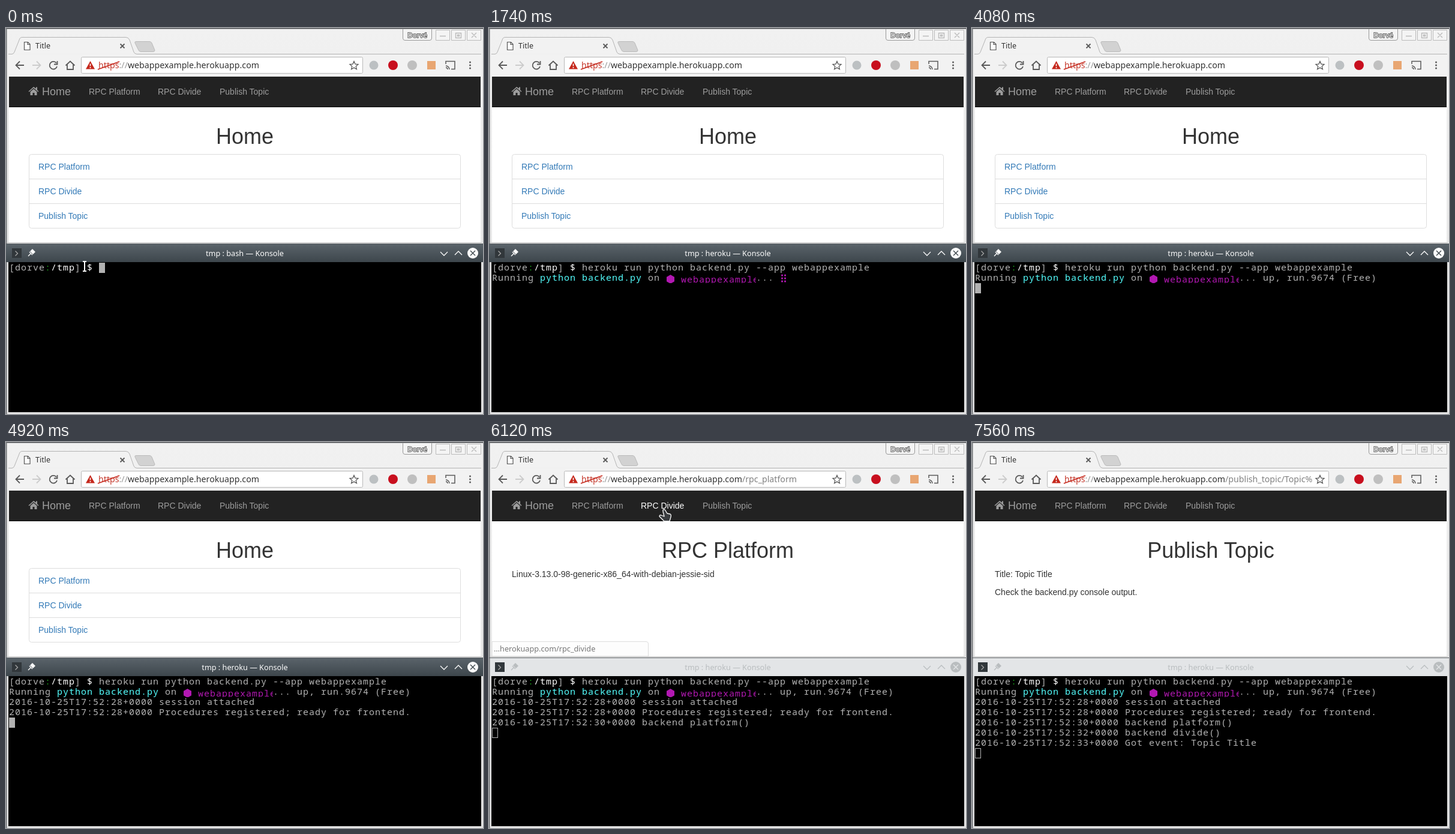
These frames come from a looping animation (795 by 643 pixels, 7580 ms). An HTML page:

```html
<!DOCTYPE html>
<html lang="en">
<head>
<meta charset="utf-8">
<title>Browser and terminal</title>
<style>
html, body { margin: 0; width: 100%; height: 100%; overflow: hidden; background: #e4e4e4; }
svg { display: block; }
text { white-space: pre; }
.ui { font-family: "Noto Sans", "Open Sans", sans-serif; font-size: 12.7px; }
.url { font-size: 14.2px; }
.page { font-family: "Liberation Sans", Arial, sans-serif; font-size: 14px; fill: #333; }
.nav { fill: #9d9d9d; }
.nav.hover { fill: #fff; }
.link { fill: #337ab7; }
.h1 { font-size: 36px; text-anchor: middle; }
.term { font-family: "Noto Sans Mono", "DejaVu Sans Mono", monospace; font-size: 15px; letter-spacing: 1px; fill: #b2b2b2; }
.w { fill: #fff; } .c { fill: #54ffff; } .m { fill: #b218b2; } .g { fill: #18a018; }
.line { fill: none; stroke: #5a5a5a; stroke-width: 1.8; }
</style>
</head>
<body>
<svg width="795" height="643" viewBox="0 0 795 643">
<defs>
  <linearGradient id="dark" x2="0" y2="1"><stop stop-color="#5a636a"/><stop offset="1" stop-color="#3d464c"/></linearGradient>
  <linearGradient id="strip" x2="0" y2="1"><stop stop-color="#f1f1f1"/><stop offset="1" stop-color="#e9e9e9"/></linearGradient>
  <clipPath id="field"><path d="M126 49H567V75H126z"/></clipPath>
  <clipPath id="appClip"><path d="M295 408H445V425H295z"/></clipPath>
  <g id="bar">
    <text class="ui" id="title" x="398" y="380" text-anchor="middle" fill="currentColor"></text>
    <path d="M37 380l4-4m-2-3l5 5m-3-6l3-3 4 4-3 3z" fill="currentColor" stroke="currentColor" stroke-width="1.4"/>
    <path d="M724 373l6 6 6-6M748 378l6-6 6 6" fill="none" stroke="currentColor" stroke-width="1.3"/>
    <circle cx="778" cy="375" r="9" fill="currentColor"/>
    <path d="M774 371l8 8m0-8l-8 8" style="stroke:var(--x)" stroke-width="1.4"/>
  </g>
</defs>

<!-- browser frame -->
<path d="M0 0H795V360H0z" fill="url(#strip)"/>
<path d="M0 0H795V1.5H0z" fill="#4a4d50"/>
<path d="M0 0H1.5V643H0z" fill="#74777a"/>
<path d="M4 44H792V81H4z" fill="#f2f2f2"/>
<path d="M4 43.5H10Q13 43 14 40L22 20Q23 15.5 27 15.5H200Q204 15.5 206 20L213 40Q214 43 218 43.5H792" fill="#f2f2f2" stroke="#b4b4b4"/>
<path d="M217 22.500H239Q242 22.500 243 25L248 37Q248 39.500 245 39.500H225Q222 39.500 221 37L215 25Q214 22.500 217 22.500z" fill="#d2d2d2" stroke="#bbb"/>
<path id="favicon" d="M30.500 23.500H36.500L40 27V36.500H30.500zM36 23.500V27.500H40" fill="#fff" stroke="#555" stroke-width="1.2"/>
<text class="ui" x="49" y="34" style="font-size:12.5px" fill="#333">Title</text>
<path d="M190.500 26.500l7 7m0-7l-7 7" class="line" stroke-width="1.5"/>
<path d="M661.500 2V17Q661.500 20.500 665 20.500H706Q709.500 20.500 709.500 17V2" fill="#f4f4f4" stroke="#999"/>
<text class="ui" x="685.500" y="16" text-anchor="middle" style="font-size:11.5px" fill="#fff" stroke="#666" stroke-width="2" paint-order="stroke">Dorvé</text>
<g fill="#f4f4f4" stroke="#bbb">
  <path d="M716.500 3.500h23v17h-23zM742.500 3.500h23v17h-23zM768.500 3.500h23v17h-23z"/>
  <path d="M723 13.500h10M749.500 8.500h9v8h-9zM752.500 11.500h3v2h-3zM776 8l8 8m0-8l-8 8" stroke-width="1.4"/>
</g>

<!-- toolbar -->
<g class="line">
  <path d="M30 62H17M23 55.500L16.500 62l6.500 6.500"/>
  <path d="M44 62H57M51 55.500l6.500 6.500-6.500 6.500" stroke="#ccc"/>
  <path id="reload" d="M84 58.500A6.300 6.300 0 1 0 85 64M85.500 55V60.500H80"/>
  <path id="stop" d="M73.500 56.500l11 11m0-11l-11 11"/>
  <path d="M99.500 62.500L107 55.500l7.500 7M102 61V69H112V61"/>
</g>
<rect x="125.500" y="48.500" width="469" height="27" rx="2" fill="#fff" stroke="#b8b8b8"/>
<path d="M140.500 55L148 68.500H133z" fill="#c5281c"/>
<path d="M140.500 59.500v4m0 1.500v2" stroke="#fff" stroke-width="1.600"/>
<g clip-path="url(#field)">
  <text class="ui url" x="154" y="67" fill="#999"><tspan fill="#c5392c">https</tspan>://<tspan fill="#333">webappexample.herokuapp.com</tspan><tspan id="path" fill="#808080"></tspan></text>
</g>
<path d="M153 69L189 56" stroke="#c5281c" stroke-width="1.800"/>
<path d="M580 55.500l2 4.600 5 .4-3.800 3.300 1.200 4.900-4.400-2.600-4.400 2.600 1.200-4.900-3.800-3.300 5-.4z" class="line" style="stroke-width:1.3"/>
<circle cx="613" cy="62" r="7.500" fill="#bcc0c2"/>
<circle cx="645" cy="62" r="8" fill="#c80f1e"/>
<circle cx="677" cy="62" r="8" fill="#bfbfbf"/>
<path d="M702 55h14v14h-14z" fill="#e8a672"/>
<path d="M733 60V55.500H748V68.500H742M733 63a6 6 0 0 1 6 6m-6-3a3 3 0 0 1 3 3" class="line" style="stroke-width:1.5"/>
<g fill="#5a5a5a"><circle cx="773.500" cy="57" r="1.500"/><circle cx="773.500" cy="62" r="1.500"/><circle cx="773.500" cy="67" r="1.500"/></g>

<!-- page -->
<path d="M5 81H791V357H5z" fill="#fff"/>
<path d="M5 81H791V131H5z" fill="#222"/>
<path d="M5 131H791V132H5z" fill="#080808"/>
<path d="M46 98l-8.500 7.500 1 1L46 100l7.500 6.500 1-1-2.500-2.300V98.500h-2v2.300zM46 101.500l-5.500 4.700V112H44.500V108H47.500V112H51.500V106.200z" fill="#9d9d9d"/>
<g class="page">
  <text class="nav" x="60" y="112" style="font-size:18px">Home</text>
  <text class="nav item" x="138" y="111">RPC Platform</text>
  <text class="nav item" x="253" y="111">RPC Divide</text>
  <text class="nav item" x="356" y="111">Publish Topic</text>
  <g data-on="0,5860">
    <text class="h1" x="398" y="193">Home</text>
    <rect x="38.500" y="210.500" width="719" height="123" rx="4" fill="#fff" stroke="#ddd"/>
    <path d="M38 251.500H758M38 292.500H758" stroke="#ddd"/>
    <text class="link" x="54" y="236">RPC Platform</text>
    <text class="link" x="54" y="277">RPC Divide</text>
    <text class="link" x="54" y="318">Publish Topic</text>
  </g>
  <g data-on="5860,6480">
    <text class="h1" x="398" y="193">RPC Platform</text>
    <text x="38" y="225">Linux-3.13.0-98-generic-x86_64-with-debian-jessie-sid</text>
  </g>
  <g data-on="6480,7140">
    <text class="h1" x="398" y="193">RPC Divide</text>
    <text x="38" y="225">3 / 4 = 0.75</text>
  </g>
  <g data-on="7140,7580">
    <text class="h1" x="398" y="193">Publish Topic</text>
    <text x="38" y="225">Title: Topic Title</text>
    <text x="38" y="255">Check the backend.py console output.</text>
  </g>
</g>
<g id="status">
  <path d="M5 332.500H262Q265.500 332.500 265.500 336V357H5z" fill="#fdfdfd" stroke="#ddd"/>
  <text class="ui" id="hint" x="8" y="349" fill="#777"></text>
</g>
<path d="M2 357.500H793" stroke="#c4c4c4"/>
<path d="M0 359.500H795" stroke="#5c6165"/>

<!-- terminal -->
<path d="M2 360H793V390H2z" fill="#e3e5e7"/>
<use href="#bar" style="color:#b9bdbf;--x:#e3e5e7"/>
<g id="active">
  <path d="M0 360H795V390H0z" fill="url(#dark)"/>
  <use href="#bar" style="color:#fcfcfc;--x:#3d464c"/>
</g>
<path d="M10 367h16v16h-16z" fill="#31373b"/>
<path d="M15.500 371.500l4 4-4 4" fill="none" stroke="#aaa" stroke-width="1.200"/>
<path d="M4 390H792V640H4z"/>
<g class="term">
  <text x="5" y="404">[dorve<tspan class="g">:</tspan><tspan class="w">/tmp</tspan>] <tspan class="w">$</tspan> <tspan id="command"></tspan></text>
  <g data-on="1420,7580">
    <text x="5" y="421">Running <tspan class="c">python backend.py</tspan> on</text>
    <g class="m" clip-path="url(#appClip)">
      <path d="M302.500 411l6.500 3.700v7.500l-6.500 3.700-6.500-3.700v-7.500z"/>
      <text x="320" y="424">webappexample</text>
    </g>
    <text x="445" y="421">...</text>
  </g>
  <g id="spinner" class="m" data-on="1420,3500"></g>
  <text data-on="2400,3500" x="505" y="421">connecting, run.9674 (Free)</text>
  <text data-on="3500,7580" x="485" y="421">up, run.9674 (Free)</text>
  <g id="log"></g>
</g>
<rect id="caret" x="5" width="10" height="17"/>

<!-- pointers, hot spot at 0,0 -->
<g id="mouse" stroke-linejoin="round">
  <path id="beam" d="M-3 -8H3M0 -8V8M-3 8H3" fill="none" stroke="#fff" stroke-width="2"/>
  <path id="arrow" d="M0 0V17L4.500 14H12z" fill="#3a3d40" stroke="#fff" stroke-width="1.300"/>
  <path id="hand" d="M0 1Q2 -1 4 2L7 7 12 8Q14 9 13 13L11 20H2L-6 12Q-6 9 -3 10L2 12 0 4z" fill="#3a3d40" stroke="#fff" stroke-width="1.300"/>
</g>
</svg>
<script>
const LOOP = 7580, ENTER = 1260, TYPE_FROM = 60, TYPE_STEP = 23;
const COMMAND = "heroku run python backend.py --app webappexample";
const LOG = [
  [4200, "28+0000 session attached"],
  [4300, "28+0000 Procedures registered; ready for frontend."],
  [5900, "30+0000 backend platform()"],
  [6440, "32+0000 backend divide()"],
  [7180, "33+0000 Got event: Topic Title"]
];
// time, x, y
const MOUSE = [
  [5300, 131, 397], [5400, 128, 290], [5500, 155, 182], [5600, 178, 118], [5920, 178, 118],
  [6120, 290, 112], [6480, 290, 112], [6620, 359, 109], [6960, 359, 109], [7340, -25, -25]
];
const LOADING = [[5620, 5860], [6220, 6480], [6860, 7140]];
const LINKS = ["rpc_platform", "rpc_divide", "publish_topic"];
const PATHS = [[7140, "/publish_topic/Topic%20Title"], [6480, "/rpc_divide/3/4"], [5860, "/rpc_platform"], [0, ""]];
const SPIN = [[0, 0], [0, 1], [0, 2], [0, 3], [1, 3], [1, 2], [1, 1], [1, 0]];

const $ = id => document.getElementById(id);
const show = (el, on) => el.style.display = on ? "" : "none";
const put = (el, s) => { if (el.textContent !== s) el.textContent = s; };
const clamp = v => Math.max(0, Math.min(1, v));

$("log").innerHTML = LOG.map(([t, s], i) =>
  `<text data-on="${t},${LOOP}" x="5" y="${438 + 17 * i}">2016-10-25T17:52:${s}</text>`).join("");
$("spinner").innerHTML = SPIN.map(([x, y]) =>
  `<rect x="${487 + 5 * x}" y="${410.5 + 5 * y}" width="3" height="3" rx="1"/>`).join("");
const dots = [...$("spinner").children];
const items = document.querySelectorAll(".item");
const timed = [...document.querySelectorAll("[data-on]")].map(el => [el, ...el.dataset.on.split(",").map(Number)]);

function mouseAt(t) {
  const i = MOUSE.findIndex(k => k[0] > t);
  if (i < 0) return MOUSE.at(-1).slice(1);
  if (!i) return MOUSE[0].slice(1);
  const [a, x, y] = MOUSE[i - 1], [b, u, v] = MOUSE[i], k = (t - a) / (b - a);
  return [x + (u - x) * k, y + (v - y) * k];
}

function drawCaret(t, typed, focused) {
  let col = 0, row = 2 + LOG.filter(l => l[0] <= t).length;
  if (t < ENTER) { col = 15 + typed; row = 0; }
  else if (t < 3500) row = 1;
  const inset = focused ? 0 : 0.5, c = $("caret");
  const attrs = {
    x: 5 + 10 * col + inset, y: 391 + 17 * row + inset,
    width: 10 - 2 * inset, height: 17 - 2 * inset,
    fill: focused ? "#b2b2b2" : "none", stroke: focused ? "none" : "#b2b2b2"
  };
  for (const k in attrs) c.setAttribute(k, attrs[k]);
  show(c, t < 1420 || t >= 3500);
}

function draw(t) {
  for (const [el, from, to] of timed) show(el, t >= from && t < to);
  const typed = Math.max(0, Math.min(COMMAND.length, Math.floor((t - TYPE_FROM) / TYPE_STEP)));
  put($("command"), COMMAND.slice(0, typed));
  put($("title"), `tmp : ${t < ENTER ? "bash" : "heroku"} — Konsole`);
  put($("path"), PATHS.find(p => t >= p[0])[1]);
  dots.forEach((d, i) => show(d, SPIN[i][1] < 3 && i !== (Math.floor(t / 50) + 1) % 8));
  drawCaret(t, typed, t < 5620);
  $("active").style.opacity = clamp(1 - (t - 5620) / 300);

  const loading = LOADING.some(([a, b]) => t >= a && t < b);
  show($("stop"), loading);
  show($("reload"), !loading);
  show($("favicon"), !loading);

  const [x, y] = mouseAt(t);
  const inNav = y > 90 && y < 131;
  const over = inNav ? [[138, 224], [253, 327], [356, 440]].findIndex(([a, b]) => x >= a && x <= b) : -1;
  items.forEach((el, i) => el.classList.toggle("hover", i === over));
  show($("status"), over >= 0);
  put($("hint"), over < 0 ? "" : `…herokuapp.com/${LINKS[over]}`);

  $("mouse").setAttribute("transform", `translate(${x} ${y})`);
  show($("mouse"), t < TYPE_FROM + TYPE_STEP || t >= 5300);
  const beam = y > 390, hand = over >= 0 && !loading;
  show($("beam"), beam);
  show($("hand"), hand);
  show($("arrow"), !beam && !hand);
}

const start = performance.now();
function tick() {
  draw((performance.now() - start) % LOOP);
  requestAnimationFrame(tick);
}
tick();
</script>
</body>
</html>
```
